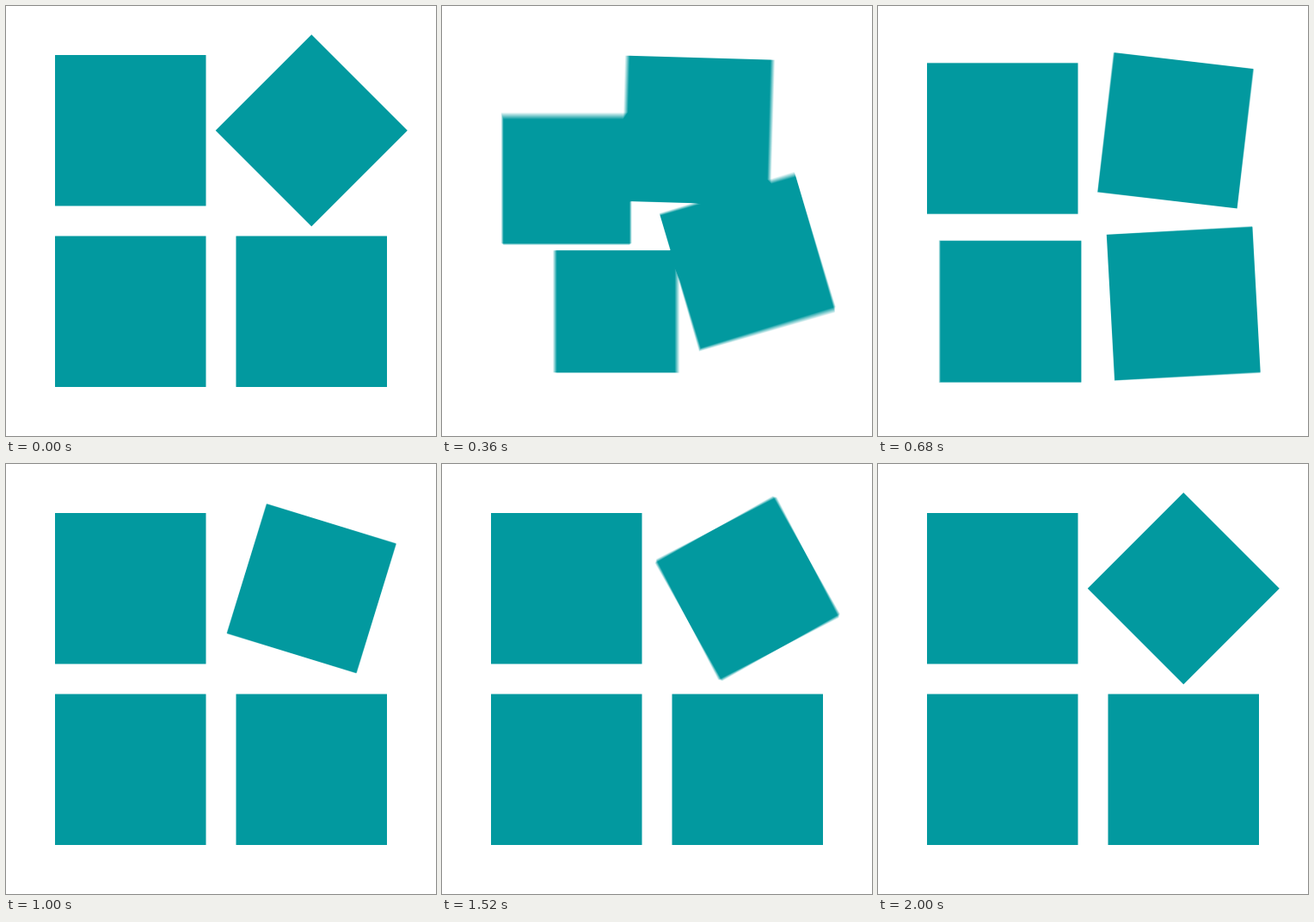
These frames come from a looping animation (500 by 500 pixels, 3 s). An HTML page with a canvas:

```html
<!DOCTYPE html>
<html lang="en">
<head>
<meta charset="utf-8">
<title>Rotating tiles</title>
<style>
  html, body { margin: 0; width: 100%; height: 100%; overflow: hidden; background: #fff; }
  canvas { display: block; width: 100%; height: 100%; }
</style>
</head>
<body>
<canvas id="stage" width="500" height="500"></canvas>
<script>
const ctx = document.getElementById('stage').getContext('2d');
const LOOP = 3000, STEP = 40, SHUTTER = 18, SAMPLES = 16;
const TEAL = '#02999f';
const LOW = 144.75, HIGH = 355.25;
const FULL = 175.5, SMALL = 157.7;

const clamp = x => Math.min(1, Math.max(0, x));
const mix = (a, b, k) => a + (b - a) * k;
const smooth = x => x * x * (3 - 2 * x);

// Timing curve with flat ends: control points (a, 0) and (b, 1).
function ease(a, b) {
  return x => {
    let lo = 0, hi = 1;
    for (let i = 0; i < 24; i++) {
      const s = (lo + hi) / 2, r = 1 - s;
      if (3 * r * r * s * a + 3 * r * s * s * b + s * s * s < x) lo = s;
      else hi = s;
    }
    return smooth(hi);
  };
}

const slide = ease(0.333, 0);
const settle = ease(0.19, 0.23);
const spin = ease(1, 0.74);

// Shrinks to the given scale halfway through, then grows back.
function dip(t, duration, scale) {
  const x = clamp(t / duration) * 2;
  return FULL * mix(1, scale, smooth(x < 1 ? x : 2 - x));
}

function square(x, y, side, degrees = 0) {
  ctx.save();
  ctx.translate(x, y);
  ctx.rotate(degrees * Math.PI / 180);
  ctx.fillRect(-side / 2, -side / 2, side, side);
  ctx.restore();
}

// Every tile moves one place clockwise.
function drawTiles(t) {
  const move = clamp(t / 1000);
  const k = slide(move);
  const up = mix(HIGH, LOW, k), down = mix(LOW, HIGH, k);
  square(LOW, up, dip(t, 480, 0.7));
  square(up, HIGH, dip(t, 834, 0.8));
  square(HIGH, down, mix(SMALL, FULL, move), mix(-45, 0, settle(move)));
  square(down, LOW, mix(FULL, SMALL, move), 135 * spin(clamp(t / 2000)));
}

function render(now) {
  const t = Math.floor((now % LOOP) / STEP) * STEP;
  ctx.clearRect(0, 0, 500, 500);

  // Add up coverage over the shutter time for motion blur, then tint it.
  ctx.globalCompositeOperation = 'lighter';
  ctx.globalAlpha = 1 / SAMPLES;
  ctx.fillStyle = '#000';
  for (let i = 0; i < SAMPLES; i++) {
    drawTiles(t + SHUTTER * ((i + 0.5) / SAMPLES - 0.5));
  }
  ctx.globalCompositeOperation = 'source-in';
  ctx.globalAlpha = 1;
  ctx.fillStyle = TEAL;
  ctx.fillRect(0, 0, 500, 500);
  ctx.globalCompositeOperation = 'source-over';
}

const start = performance.now();
function tick() {
  render(performance.now() - start);
  requestAnimationFrame(tick);
}
tick();
</script>
</body>
</html>
```
